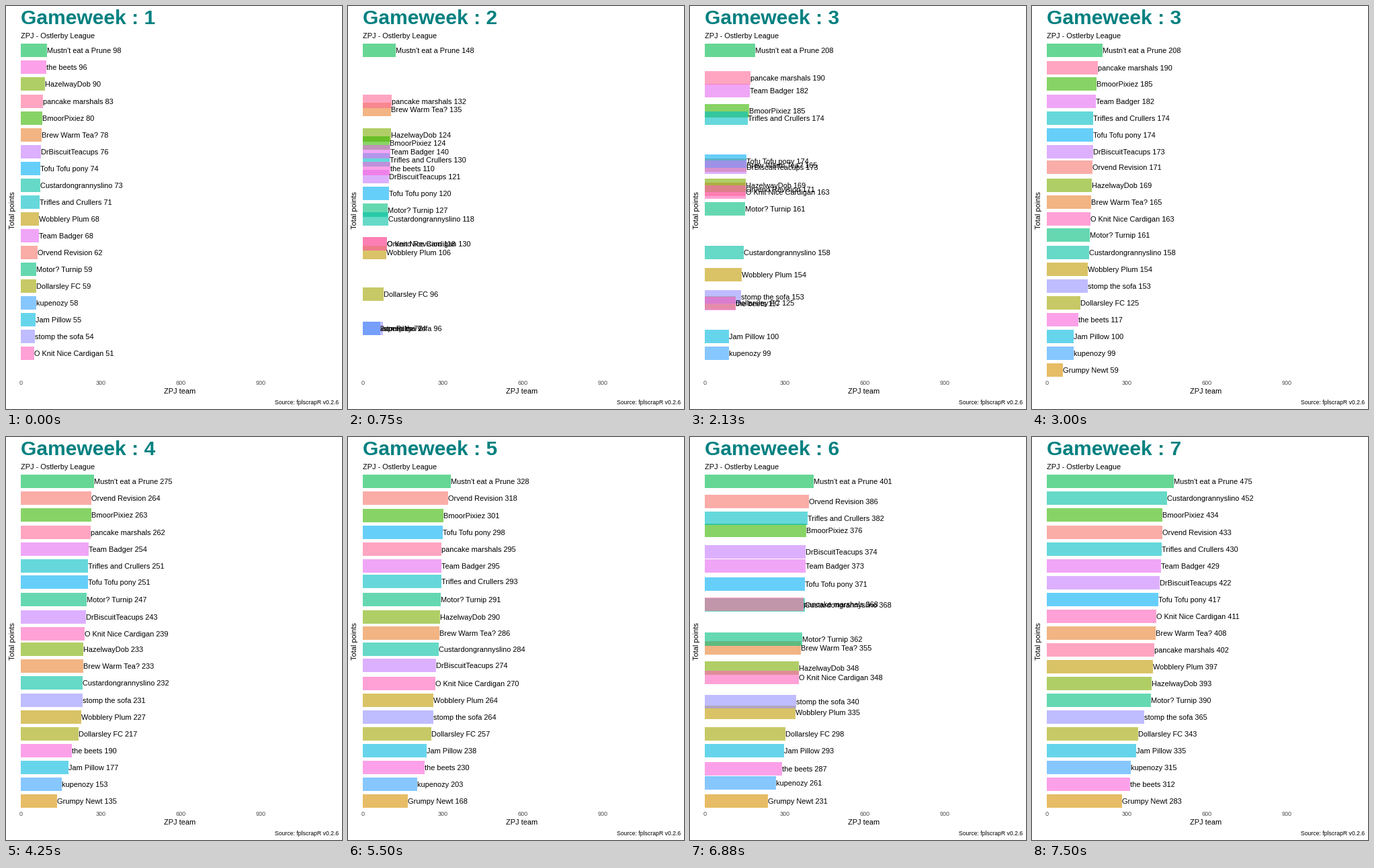
A matplotlib script for the animation above (8 s loop, 500 by 600 pixels).

```python
import numpy as np
import matplotlib.pyplot as plt
from matplotlib.animation import FuncAnimation
from matplotlib.patches import Rectangle

W, H, DPI = 500, 600, 100
FRAMES, INTERVAL = 64, 125
WEEKS = 7
X0, X_UNIT = 22, 0.397        # zero line and pixels per point
ROW0, ROW_STEP, BAR_H = 66.4, 25.04, 20

# Running totals per week; a late joiner has a shorter list.
SCORES = {
    "Orvend Revision": [62, 118, 171, 264, 318, 386, 433],
    "Brew Warm Tea?": [78, 135, 165, 233, 286, 355, 408],
    "Grumpy Newt": [59, 135, 168, 231, 283],
    "Wobblery Plum": [68, 106, 154, 227, 264, 335, 397],
    "Dollarsley FC": [59, 96, 125, 217, 257, 298, 343],
    "HazelwayDob": [90, 124, 169, 233, 290, 348, 393],
    "BmoorPixiez": [80, 124, 185, 263, 301, 376, 434],
    "Mustn't eat a Prune": [98, 148, 208, 275, 328, 401, 475],
    "Motor? Turnip": [59, 127, 161, 247, 291, 362, 390],
    "Custardongrannyslino": [73, 118, 158, 232, 284, 368, 452],
    "Trifles and Crullers": [71, 130, 174, 251, 293, 382, 430],
    "Jam Pillow": [55, 74, 100, 177, 238, 293, 335],
    "Tofu Tofu pony": [74, 120, 174, 251, 298, 371, 417],
    "kupenozy": [58, 72, 99, 153, 203, 261, 315],
    "stomp the sofa": [54, 96, 153, 231, 264, 340, 365],
    "DrBiscuitTeacups": [76, 121, 173, 243, 274, 374, 422],
    "Team Badger": [68, 140, 182, 254, 295, 373, 429],
    "the beets": [96, 110, 117, 190, 230, 287, 312],
    "O Knit Nice Cardigan": [51, 130, 163, 239, 270, 348, 411],
    "pancake marshals": [83, 132, 190, 262, 295, 368, 402],
}
NAMES = list(SCORES)
# These win ties, in this order; the rest follow the table.
TIE_FIRST = ["BmoorPixiez", "HazelwayDob", "Motor? Turnip", "pancake marshals"]
TIE_ORDER = TIE_FIRST + [n for n in NAMES if n not in TIE_FIRST]


def hcl(hue, chroma=100, lum=65):
    """Polar LUV colour to clipped sRGB."""
    a = np.radians(hue)
    y = ((lum + 16) / 116) ** 3
    u = chroma * np.cos(a) / (13 * lum) + 0.1978398
    v = chroma * np.sin(a) / (13 * lum) + 0.4683363
    x = 9 * y * u / (4 * v)
    z = -x / 3 - 5 * y + 3 * y / v
    rgb = np.array([3.240479 * x - 1.537150 * y - 0.498535 * z,
                    -0.969256 * x + 1.875992 * y + 0.041556 * z,
                    0.055648 * x - 0.204043 * y + 1.057311 * z])
    rgb = np.clip(rgb, 0, 1)
    return np.where(rgb > 0.00304, 1.055 * rgb ** (1 / 2.4) - 0.055, 12.92 * rgb)


def score(name, week):
    i = week - (WEEKS - len(SCORES[name]))
    return SCORES[name][i] if i >= 0 else None


def ranking(week):
    present = [n for n in TIE_ORDER if score(n, week) is not None]
    present.sort(key=lambda n: -score(n, week))
    return {n: r for r, n in enumerate(present)}


RANKS = [ranking(w) for w in range(WEEKS)]


def ease(p):
    return 4 * p ** 3 if p < 0.5 else 1 - 4 * (1 - p) ** 3


def progress(frame):
    """Week being left and the eased share of the way to the next one."""
    week = min(frame // 10, WEEKS - 2)
    end = 10 * (week + 1)
    length = 8 if week == 0 else 7
    return week, ease(min(max((frame - end + length) / length, 0), 1))


plt.rcParams["font.family"] = "Liberation Sans"
fig = plt.figure(figsize=(W / DPI, H / DPI), dpi=DPI, facecolor="white")
ax = fig.add_axes([0, 0, 1, 1])
ax.set_xlim(0, W)
ax.set_ylim(H, 0)
ax.axis("off")


def text(x, y, s, px=11, **kw):
    return ax.text(x, y, s, fontsize=px * 72 / DPI, va="baseline", **kw)


title = text(X0, 27, "", 30, weight="bold", color="#008080")
text(X0, 48, "ZPJ - Ostlerby League")
for value in range(0, 901, 300):
    text(X0 + value * X_UNIT, 564, str(value), 9, ha="center", color="#4d4d4d")
text(258.5, 577, "ZPJ team", ha="center")
text(13, 304, "Total points", ha="center", rotation=90, rotation_mode="anchor")
text(495, 593, "Source: fplscrapR v0.2.6", 8.6, ha="right")

bars, labels = {}, {}
for i, name in enumerate(NAMES):
    bars[name] = ax.add_patch(Rectangle(
        (X0, 0), 0, BAR_H, facecolor=hcl(15 + 360 * i / len(NAMES)),
        alpha=0.6, linewidth=0, antialiased=False, snap=True, zorder=1))
    labels[name] = text(0, 0, "", zorder=3)


def draw(frame):
    week, p = progress(frame)
    shown = week + (p >= 0.5)
    title.set_text(f"Gameweek : {shown + 1}")
    for name in NAMES:
        bar, label = bars[name], labels[name]
        a, b = score(name, week), score(name, week + 1)
        entering = a is None
        visible = b is not None and (not entering or p == 1)
        bar.set_visible(visible)
        label.set_visible(visible)
        if not visible:
            continue
        rank_b = RANKS[week + 1][name]
        rank_a = rank_b if entering else RANKS[week][name]
        start = b if entering else a
        width = (start + (b - start) * p) * X_UNIT
        y = ROW0 + ROW_STEP * (rank_a + (rank_b - rank_a) * p)
        bar.set_y(y - BAR_H / 2)
        bar.set_width(width)
        label.set_position((X0 + width, y + 4))
        label.set_text(f"{name} {score(name, shown)}")
    return [title, *bars.values(), *labels.values()]


anim = FuncAnimation(fig, draw, frames=FRAMES, interval=INTERVAL,
                     repeat=True, repeat_delay=0, blit=False)
plt.show()
```
